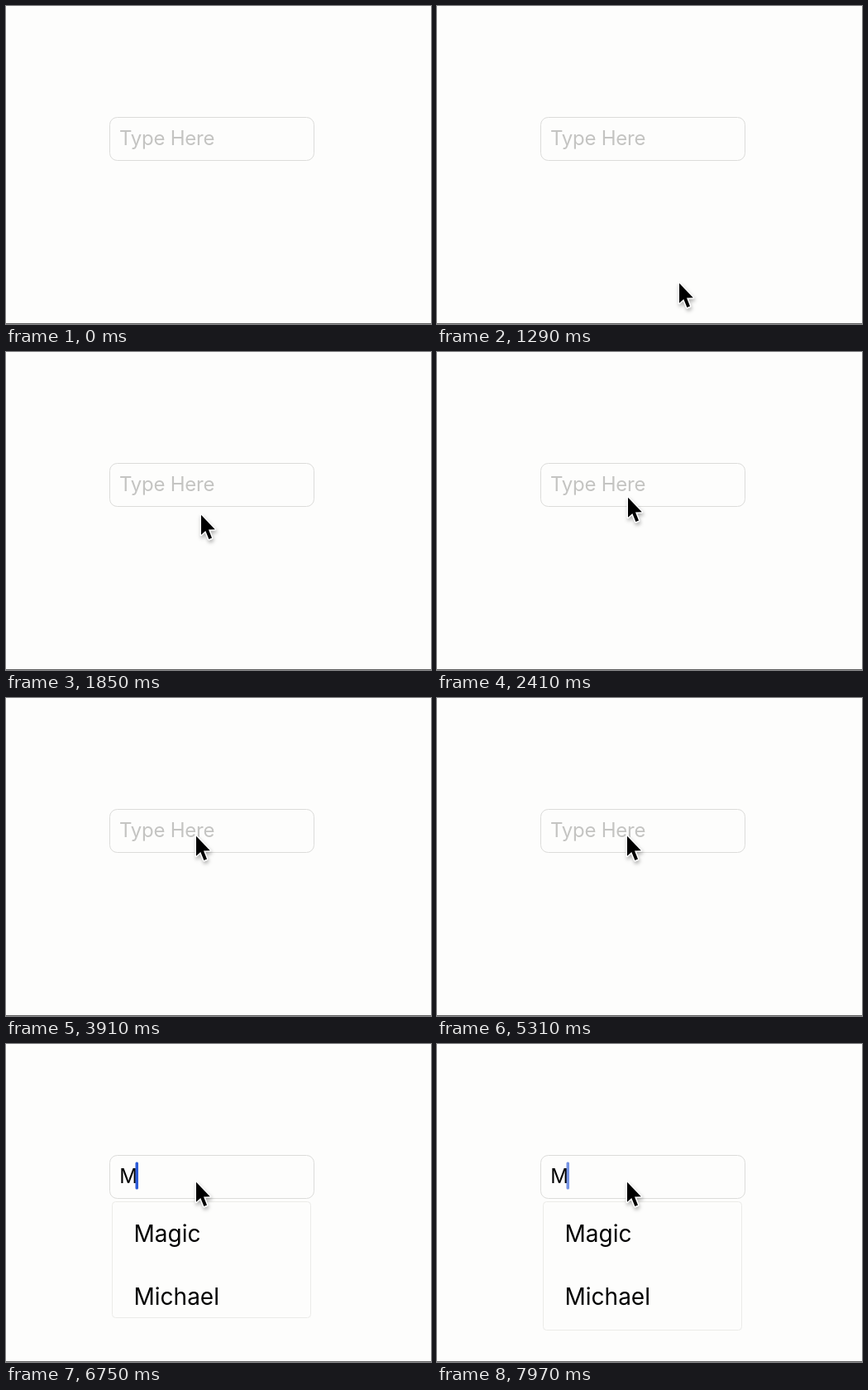
Animation of 514x384 px, one loop 7.99 s. Source, as an HTML page:

```html
<!DOCTYPE html>
<html lang="en">
<head>
<meta charset="utf-8">
<title>Autocomplete field</title>
<style>
  html, body { margin: 0; width: 100%; height: 100%; overflow: hidden; background: #fdfdfc; }
  svg { display: block; width: 100%; height: 100%; }
  text { font-family: Inter, "Liberation Sans", sans-serif; }
  .input { font-size: 24px; letter-spacing: -.25px; }
  .item { font-size: 28px; }
  #hint { fill: #c4c4c2; }
  .pointer { stroke: #fff; stroke-width: 3px; stroke-linejoin: round; paint-order: stroke; }
  #cursor { filter: drop-shadow(1px 3px 2px rgba(0, 0, 0, .28)); }
</style>
</head>
<body>
<svg viewBox="0 0 514 384">
  <defs>
    <clipPath id="reveal"><rect id="window" x="128" y="190" width="242" height="0"/></clipPath>
  </defs>
  <rect y="383" width="514" height="1" fill="#606060"/>
  <rect x="125.5" y="134.5" width="247" height="52" rx="9" fill="none" stroke="#dcdcda"/>
  <text id="hint" class="input" x="137" y="168">Type Here</text>
  <text id="typed" class="input" x="137.2" y="168">M</text>
  <rect id="caret" y="142.5" width="3.5" height="33" rx="1.5" fill="#2c5ad6"/>
  <g id="menu">
    <rect id="panel" x="128.5" y="190.5" width="240" rx="4" fill="#fdfdfc" stroke="#ebebe8"/>
    <g clip-path="url(#reveal)">
      <text class="item" x="154.5" y="239">Magic</text>
      <text class="item" x="154.5" y="315">Michael</text>
    </g>
  </g>
  <g id="cursor">
    <path class="pointer" d="M1 1.7V25.7L6.3 21L10.4 31L14 29.5L10 19.6L17.8 19.2Z"/>
  </g>
</svg>
<script>
  const LOOP = 7990;
  const TYPED = 133, FOCUSED = 112, MENU_START = 134.5, MENU_END = 145;
  const MENU_HEIGHT = 155, FADE_START = 163;

  // [step, x, y] of the pointer tip
  const path = [
    [19, 466, 380], [22, 370, 362], [26, 292, 333], [30, 256, 278],
    [34, 241, 228], [38, 235, 195], [44, 231, 180], [50, 230, 174],
    [54, 230, 170], [58, 229, 165]
  ];

  const el = id => document.getElementById(id);
  const [hint, typed, caret, menu, panel, reveal, cursor] =
    ["hint", "typed", "caret", "menu", "panel", "window", "cursor"].map(el);
  const clamp = v => Math.min(1, Math.max(0, v));
  const smooth = p => p * p * (3 - 2 * p);
  const show = (node, on) => node.setAttribute("visibility", on ? "visible" : "hidden");

  // Steps come in groups of three: two short holds, then a long one.
  function stepAt(t) {
    if (t < 270) return t < 20 ? 0 : t < 160 ? 1 : 2;
    const s = t - 270;
    return 3 + 3 * Math.floor(s / 140) + Math.min(2, Math.floor(s % 140 / 20));
  }

  function pointAt(n) {
    const i = path.findIndex(p => p[0] > n);
    if (i < 0) return path[path.length - 1].slice(1);
    const [a, b] = [path[i - 1], path[i]];
    const p = (n - a[0]) / (b[0] - a[0]);
    return [1, 2].map(k => a[k] + (b[k] - a[k]) * p);
  }

  function draw(t) {
    const n = stepAt(t);
    const hasText = n >= TYPED;

    const visible = n >= path[0][0];
    show(cursor, visible);
    if (visible) cursor.setAttribute("transform", `translate(${pointAt(n).map(Math.round)})`);

    show(hint, !hasText);
    show(typed, hasText);
    show(caret, n >= FOCUSED);
    caret.setAttribute("x", hasText ? 156.5 : 136.5);
    caret.setAttribute("opacity", 1 - .07 * Math.max(0, n - FADE_START));

    const height = MENU_HEIGHT * smooth(clamp((n - MENU_START) / (MENU_END - MENU_START)));
    show(menu, height > 0);
    panel.setAttribute("height", Math.round(height));
    reveal.setAttribute("height", height);
  }

  const start = performance.now();
  function tick() {
    draw((performance.now() - start) % LOOP);
    requestAnimationFrame(tick);
  }
  draw(0);
  requestAnimationFrame(tick);
</script>
</body>
</html>
```
